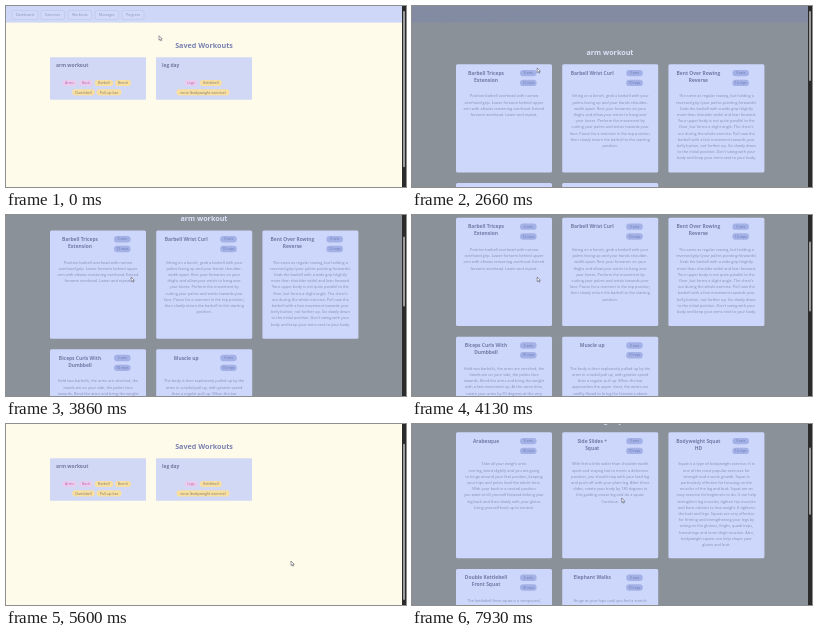
An HTML page that plays this animation: 400x181 px, repeating every 8000 ms.

```html
<!DOCTYPE html>
<html lang="en">
<head>
<meta charset="utf-8">
<title>Saved Workouts</title>
<style>
  html, body { margin: 0; width: 100%; height: 100%; overflow: hidden; background: #fffbeb; }
  svg { display: block; width: 400px; height: 181px; }
  text { font-family: "Open Sans", "Noto Sans", sans-serif; text-anchor: middle; }
  .head { font-size: 7.2px; font-weight: 700; fill: #7981b0; }
  .name { font-size: 4.95px; font-weight: 700; fill: #717a9f; text-anchor: start; }
  .chip { font-size: 3.6px; fill: #7f7a72; }
  .pink { fill: #c161ae; }
  .nav { font-size: 3.5px; fill: #8993bd; }
  .title { font-size: 4.9px; font-weight: 700; fill: #727ca6; }
  .pill { font-size: 3.5px; fill: #6d79b0; }
  .body { font-size: 3.85px; fill: #868fb6; }
</style>
</head>
<body>
<svg id="stage" viewBox="0 0 400 181">
  <defs>
    <filter id="soft" x="-20%" y="-30%" width="140%" height="160%"><feGaussianBlur stdDeviation="1.5"/></filter>
  </defs>
</svg>
<script>
const LOOP = 8000, STEP = 1000 / 15;
const stage = document.getElementById('stage');

function el(parent, tag, attrs = {}, content) {
  const node = document.createElementNS('http://www.w3.org/2000/svg', tag);
  for (const key in attrs) node.setAttribute(key, attrs[key]);
  if (content) node.textContent = content;
  parent.appendChild(node);
  return node;
}
const rect = (parent, x, y, width, height, fill, rx = 0, more = {}) =>
  el(parent, 'rect', { x, y, width, height, fill, rx, ...more });
const label = (parent, x, y, cls, content) => el(parent, 'text', { x, y, class: cls }, content);

function navBar(parent, bar, fill, line, opacity) {
  rect(parent, 0, 0, 396, 16.6, bar);
  const items = [['Dashboard', 6, 26], ['Exercises', 35, 23.5], ['Workouts', 62, 23.5],
    ['Messages', 89, 23.5], ['Progress', 116, 22]];
  const group = el(parent, 'g', { opacity });
  for (const [name, x, w] of items) {
    rect(group, x, 4.4, w, 9, fill, 2, { stroke: line, 'stroke-width': 0.5 });
    label(group, x + w / 2, 10.2, 'nav', name);
  }
}

// Saved list
const page = el(stage, 'g');
navBar(page, '#cfd7f8', '#d2d9f8', '#b3bde6', 1);
label(page, 198, 41.6, 'head', 'Saved Workouts');

function savedCard(x, name, chips) {
  const shadow = rect(page, x - 0.3, 53, 96.6, 42.5, '#6d7aa8', 1, { filter: 'url(#soft)', opacity: 0 });
  rect(page, x, 51.3, 96, 42.5, '#d0d8f6', 1);
  label(page, x + 6, 61, 'name', name);
  for (const [content, cx, y, w, pink] of chips) {
    rect(page, cx - w / 2, y - 3.1, w, 6.2, pink ? '#e9cdee' : '#f8dfa0', 3.1);
    label(page, cx, y + 1.25, pink ? 'chip pink' : 'chip', content);
  }
  return shadow;
}
const armShadow = savedCard(44, 'arm workout', [
  ['Arms', 63.5, 77, 15, 1], ['Back', 80, 77, 14, 1], ['Barbell', 98, 77, 18.5], ['Bench', 117, 77, 16],
  ['Dumbbell', 77.5, 86.3, 22.5], ['Pull-up bar', 103, 86.3, 25]]);
const legShadow = savedCard(150, 'leg day', [
  ['Legs', 185, 77, 13.5, 1], ['Kettlebell', 204.8, 77, 22], ['none (bodyweight exercise)', 197, 86.3, 53]]);

// Workout details
function details(name, rowHeight, cards) {
  const group = el(stage, 'g');
  rect(group, 0, 0, 396, 460, '#8b9199');
  navBar(group, '#828ba2', '#828ba2', '#7c859e', 0.35);
  const head = label(group, 198, 48.7, 'head', name);
  head.style.fill = '#dbe1f8';
  cards.forEach(([title, sets, reps, body], i) => {
    const x = 44 + (i % 3) * 106.2, y = i < 3 ? 58.3 : 58.3 + rowHeight + 10.6;
    rect(group, x, y, 96, rowHeight, '#cdd6fb', 1.5);
    title.split('|').forEach((line, n) => label(group, x + 30, y + 10.3 + n * 7, 'title', line));
    [sets + ' sets', reps + ' reps'].forEach((line, n) => {
      rect(group, x + 64, y + 5.6 + n * 9.8, 16.6, 6.4, '#a3b1e6', 3.2);
      label(group, x + 72.3, y + 10 + n * 9.8, 'pill', line);
    });
    body.split('|').forEach((line, n) => label(group, x + 48, y + 33.1 + n * 6.2, 'body', line));
  });
  return group;
}

const arm = details('arm workout', 108.2, [
  ['Barbell Triceps|Extension', 3, 12,
    'Position barbell overhead with narrow|overhand grip. Lower forearm behind upper|' +
    'arm with elbows remaining overhead. Extend|forearm overhead. Lower and repeat.'],
  ['Barbell Wrist Curl', 3, 10,
    'Sitting on a bench, grab a barbell with your|palms facing up and your hands shoulder-|' +
    'width apart. Rest your forearms on your|thighs and allow your wrists to hang over|' +
    'your knees. Perform the movement by|curling your palms and wrists towards your|' +
    'face. Pause for a moment in the top position,|then slowly return the barbell to the starting|position.'],
  ['Bent Over Rowing|Reverse', 3, 12,
    'The same as regular rowing, but holding a|reversed grip (your palms pointing forwards).|' +
    'Grab the barbell with a wide grip (slightly|more than shoulder wide) and lean forward.|' +
    'Your upper body is not quite parallel to the|floor, but forms a slight angle. The chest\'s|' +
    'out during the whole exercise. Pull now the|barbell with a fast movement towards your|' +
    'belly button, not further up. Go slowly down|to the initial position. Don\'t swing with your|' +
    'body and keep your arms next to your body.'],
  ['Biceps Curls With|Dumbbell', 3, 10,
    'Hold two barbells, the arms are streched, the|hands are on your side, the palms face|' +
    'inwards. Bend the arms and bring the weight|with a fast movement up. At the same time,|' +
    'rotate your arms by 90 degrees at the very'],
  ['Muscle up', 3, 10,
    'The body is then explosively pulled up by the|arms in a radial pull up, with greater speed|' +
    'than a regular pull up. When the bar|approaches the upper chest, the wrists are|' +
    'swiftly flexed to bring the forearms above']
]);

const leg = details('leg day', 126, [
  ['Arabesque', 3, 10,
    'Take all your weight onto|one leg, bend slightly and you are going|' +
    'to hinge around your feet position, keeping|your hips and pelvis level the whole time.|' +
    'With your back in a neutral position|you want to tilt yourself forward kicking your|' +
    'leg back and then slowly with your glutes|bring yourself back up to neutral.'],
  ['Side Slides +|Squat', 3, 10,
    'With feet a little wider than shoulder width|apart and staying low to mimic a defensive|' +
    'position, you should step with your lead leg|and push off with your plant leg. After three|' +
    'slides, rotate your body by 180 degrees in|this guiding crease leg and do a squat.|Continue.'],
  ['Bodyweight Squat|HD', 3, 12,
    'Squat is a type of bodyweight exercise. It is|one of the most popular exercises for|' +
    'strength and muscle growth. Squat is|particularly effective for focusing on the|' +
    'muscles of the leg and butt. Squat are an|easy exercise for beginners to do. It can help|' +
    'strengthen leg muscles, tighten hip muscles|and burn calories to lose weight. It tightens|' +
    'the butt and legs. Squats are very effective|for firming and strengthening your legs by|' +
    'acting on the gluteus, thighs, quadriceps,|hamstrings and inner thigh muscles. Also,|' +
    'bodyweight squats can help shape your|glutes and butt.'],
  ['Double Kettlebell|Front Squat', 3, 10, 'The kettlebell front squat is a compound,'],
  ['Elephant Walks', 3, 10, 'Hinge at your hips until you feel a stretch']
]);

// Scrollbar and pointer
rect(stage, 396, 0, 4, 181, '#2b2b2b');
const thumb = rect(stage, 397, 5, 2, 150, '#9b9b9b', 1);
const pointer = el(stage, 'path', {
  d: 'M0 0V4.5L1.1 3.6L1.8 5.2L2.6 4.8L1.9 3.3H3.2Z',
  fill: '#fff', stroke: '#3c3f4c', 'stroke-width': 0.5
});

const ramp = (t, from, to) => Math.min(1, Math.max(0, (t - from) / (to - from)));
const smooth = p => p * p * (3 - 2 * p);

function scrollAt(t) {
  if (t < 3660) return 0;
  if (t < 5600) return 56 * (1 - Math.pow(1 - ramp(t, 3600, 4260), 2.8));
  if (t < 7730) return 17;
  return t < 7930 ? 40 : 50;
}

const moves = [[0, 800, 125.2, 62], [4866, 5000, 285, 137], [5866, 6066, 209.7, 74]];
function pointerAt(t) {
  let x = 153, y = 29.7;
  for (const [from, to, tx, ty] of moves) {
    const p = smooth(ramp(t, from, to));
    x += (tx - x) * p;
    y += (ty - y) * p;
  }
  return [x, y];
}

function draw(ms) {
  // The screen advances at 15 steps a second
  const t = Math.floor((ms % LOOP + 7) / STEP) * STEP % LOOP;
  const scroll = scrollAt(t);
  const inArm = t >= 1660 && t < 5600, inLeg = t >= 6330;
  const shown = inArm ? arm : inLeg ? leg : page;
  for (const view of [page, arm, leg]) view.style.display = view === shown ? '' : 'none';
  shown.setAttribute('transform', `translate(0 ${-scroll})`);
  armShadow.setAttribute('opacity', t < 1660 ? 0.85 * ramp(t, 500, 1060) : 0);
  legShadow.setAttribute('opacity', 0.85 * ramp(t, 5990, 6200));

  const height = inArm ? 442 : inLeg ? 460 : 198;
  thumb.setAttribute('y', 5 + scroll * 171 / height);
  thumb.setAttribute('height', 171 * 181 / height);
  pointer.setAttribute('transform', `translate(${pointerAt(t).join(' ')})`);
}

const start = performance.now();
function tick() {
  draw(performance.now() - start);
  requestAnimationFrame(tick);
}
tick();
</script>
</body>
</html>
```
